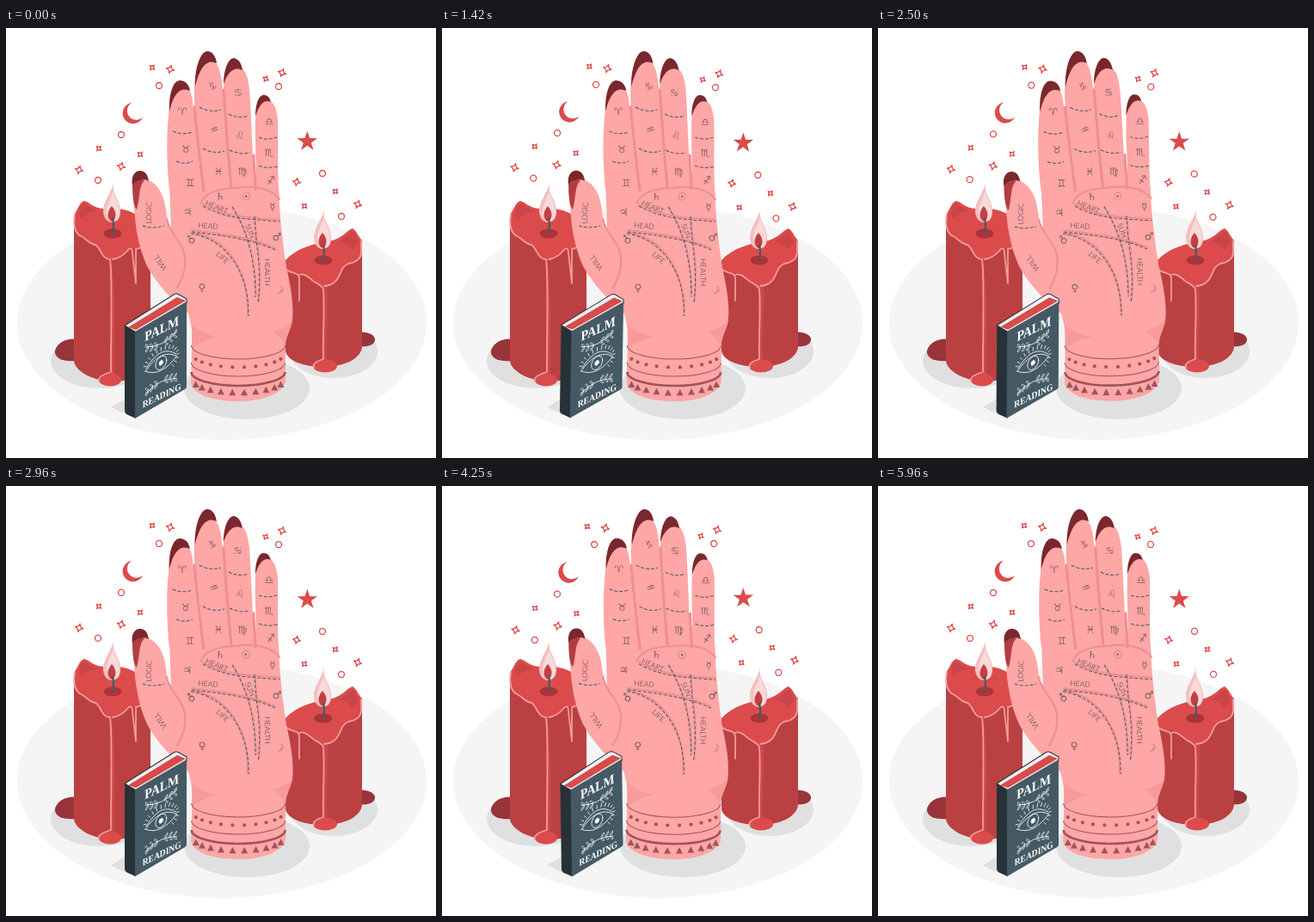
Write an HTML page that moves like this. It is 500 px wide and 500 px high and loops after 6 s.

```html
<!DOCTYPE html>
<html lang="en">
<head>
<meta charset="utf-8">
<title>Palm reading</title>
<style>
html, body { margin: 0; width: 100%; height: 100%; overflow: hidden; background: #fff; }
svg { display: block; width: 100vw; height: 100vh; }
.line { fill: none; stroke-linecap: round; stroke-linejoin: round; }
.crease { stroke: #ee8e8e; }
.dash { stroke: #455a64; stroke-width: 1; stroke-dasharray: 4 2; stroke-linecap: butt; }
.rim { stroke: #f59a9a; stroke-width: 1.8; }
.word { font: 300 8.6px Lato, sans-serif; fill: #37343c; text-anchor: middle; }
.glyph { font: 12px "DejaVu Sans", sans-serif; fill: #37343c; stroke: #ffa6a6; stroke-width: .35; text-anchor: middle; }
.title { font-family: "Liberation Serif", serif; font-weight: bold; fill: #fff; text-anchor: middle; }
</style>
</head>
<body>
<svg viewBox="0 0 500 500">
  <ellipse cx="251" cy="343" rx="238" ry="136" fill="#f5f5f5"/>
  <g fill="#e0e0e0">
    <ellipse cx="109" cy="387" rx="57" ry="32"/>
    <ellipse cx="381" cy="376" rx="51" ry="31"/>
    <ellipse cx="280" cy="419" rx="73" ry="36"/>
    <path d="M122 441L170 412L150 454Z"/>
  </g>

  <!-- left candle -->
  <path d="M80 362C67 360 56 370 57 378C59 386 70 388 80 387Z" fill="#98343a"/>
  <path d="M79 218V387C80 400 104 411 124 411C149 411 168 401 168 388V230Z" fill="#bb4042"/>
  <path d="M79 217C84 211 85 203 91 201C98 203 101 209 113 210C128 208 142 211 152 217L168 230V247C161 249 159 257 151 257C143 255 142 260 136 264C130 268 127 269 121 269C111 269 111 257 104 252C97 251 94 246 89 243C82 241 79 236 79 230Z" fill="#dc4b4c"/>
  <path d="M86 211C88 207 89 205 92 205C98 207 101 212 109 213C99 213 92 216 89 222C85 219 84 215 86 211Z" fill="#c94547"/>
  <path d="M121 268C126 280 127 330 126 402H121Z" fill="#cf4748"/>
  <ellipse cx="121" cy="409" rx="13" ry="7.5" fill="#dc4b4c"/>
  <path class="line rim" d="M80 217C78 229 80 240 89 243C94 246 97 251 104 252C111 257 111 269 121 269C124 290 122 350 122 400C114 402 106 406 108 411M124 269C132 268 137 264 142 258C145 255 147 256 147 262L151 297V257C159 257 161 249 168 247"/>

  <!-- right candle -->
  <path d="M412 354C422 353 430 358 429 363C428 369 420 371 412 370Z" fill="#98343a"/>
  <path d="M325 270V376C328 388 347 394 370 394C395 394 414 383 414 370V247Z" fill="#bb4042"/>
  <path d="M325 270C338 256 358 250 380 247C391 244 397 235 403 233C409 237 410 244 414 247V262C412 270 405 273 398 274C391 277 390 283 387 289C384 296 377 300 370 300C361 299 356 292 348 287C341 283 337 287 325 280Z" fill="#dc4b4c"/>
  <path d="M386 248C394 246 398 239 403 237C407 240 407 245 410 248C408 253 405 255 402 258C400 252 394 249 386 248Z" fill="#c94547"/>
  <path d="M368 300H374C375 325 372 350 373 386H368Z" fill="#cf4748"/>
  <ellipse cx="371" cy="393" rx="14" ry="7.5" fill="#dc4b4c"/>
  <path class="line rim" d="M326 281C334 287 340 283 341 291V317M341 287C348 284 354 293 360 296C365 299 368 300 369 304C371 330 368 355 369 385C362 387 356 390 358 395M370 300C377 300 384 296 387 289C390 283 391 277 398 274C405 273 412 270 413 262V248"/>

  <g id="flames"></g>
  <g id="sky" fill="none" stroke="#dc4b4c" stroke-width="1.3" stroke-linejoin="round"></g>

  <g id="hand">
    <g fill="#ffa6a6">
      <path d="M190 180L317 185C318 215 321 245 326 278C331 300 335 322 333 340C331 352 325 358 325 370V412C320 426 298 434 270 434C242 434 219 427 215 414L216 372C218 360 216 348 212 332C194 318 175 297 164 277C154 255 150 230 149 207C148 195 146 185 150 178L157 170L166 177C178 183 184 195 186 212C187 222 188 228 192 232Z"/>
      <path d="M190 188C186 150 187 115 190 92C193 76 198 70 204 69C213 68 216 75 217 85C220 110 222 150 230 190Z"/>
      <path d="M230 190C227 150 218 105 219 70C220 46 228 37 236 37C246 37 249 48 251 62C255 100 256 150 262 188Z"/>
      <path d="M261 188C258 150 252 100 253 68C254 52 260 45 267 45C278 45 281 55 283 70C286 110 286 150 290 188Z"/>
      <path d="M290 188C292 160 289 135 290 106C292 90 296 84 302 84C312 84 314 93 316 105C317 140 315 170 318 200Z"/>
    </g>
    <g fill="#f89a9a">
      <path d="M216 346C226 353 236 358 248 359C236 361 224 366 216 373Z"/>
      <path d="M333 340C326 347 318 351 309 353C316 357 321 362 325 369C325 358 331 352 333 340Z"/>
    </g>
    <g fill="#7a272d">
      <path d="M190 97C189 78 194 61 202 61C209 61 213 66 214 73C205 69 196 72 190 97Z"/>
      <path d="M220 68C219 48 226 27 234 27C240 27 244 33 245 41C236 37 227 40 220 68Z"/>
      <path d="M253 65C253 50 258 35 265 35C271 36 274 42 275 49C267 45 259 48 253 65Z"/>
      <path d="M290 103C290 88 294 77 300 78C305 78 307 82 308 86C301 83 295 87 290 103Z"/>
      <path d="M147 183C145 172 150 166 156 166C162 166 165 171 166 178C160 174 153 178 147 183Z"/>
    </g>
    <path d="M147 182C151 177 156 176 161 177C154 184 156 197 152 211C148 208 147 193 147 182Z" fill="#b23d41"/>
    <g class="line crease" stroke-width="3">
      <path d="M219 92C222 125 226 160 230 189"/>
      <path d="M253 72C256 112 258 150 262 184"/>
      <path d="M288 148C288 162 290 172 290 187"/>
    </g>
    <g class="line crease" stroke-width="2">
      <path d="M226 204C233 190 247 187 267 186C290 183 308 187 318 199"/>
      <path d="M187 222C190 240 206 248 208 266C209 282 205 292 199 302"/>
      <path d="M229 205C257 221 285 220 318 223M216 235C250 239 285 243 313 256M216 238C254 243 283 278 281 334"/>
      <path d="M264 208C282 237 291 270 291 311M290 219C291 255 299 276 294 318" stroke-width="1.3"/>
    </g>
    <path class="line dash" d="M194 120Q205 125 217 121M198 155Q208 159 217 155M225 92Q238 99 250 95M229 140Q241 147 254 143M259 100Q270 106 282 102M260 142Q272 148 284 145M294 127Q304 131 315 127M294 160Q304 164 316 161M159 230Q170 234 184 230M229 207C257 223 285 222 318 225M216 237C250 241 285 245 313 258M215 239C252 244 283 280 282 335M263 208C281 237 290 270 290 313M289 219C290 255 298 276 293 320"/>
    <g id="marks"></g>
    <g id="band" fill="#9c565b"></g>
  </g>

  <g id="book">
    <path d="M138 346L195 310Q198 308 201 310L210 315V320L151 354Z" fill="#eef0f1" stroke="#263238" stroke-width="1" stroke-linejoin="round"/>
    <path d="M142 348L199 313L209 317L151 351Z" fill="#d94a4b"/>
    <path d="M138 346L151 353V454L140 449Q138 447 138 445Z" fill="#263238"/>
    <path d="M150 353L210 318V417Q210 419 208 420L150 454Z" fill="#455a64"/>
    <g id="cover" transform="matrix(.866 -.42 0 1 150 351)" fill="none" stroke="#fff" stroke-width=".8" stroke-linecap="round"></g>
  </g>
</svg>
<script>
const $ = id => document.getElementById(id);
const add = (id, markup) => $(id).insertAdjacentHTML('beforeend', markup);
const rad = Math.PI / 180;

// Both flames share one shape; coordinates are relative to the wick base.
for (const [x, y] of [[124, 239], [369, 270]]) add('flames', `<g transform="translate(${x} ${y})">
  <ellipse rx="10.5" ry="5.5" fill="#a83539"/>
  <path d="M1-59C-2-46-12-36-11-25C-10-16-5-13 0-13C8-14 11-22 8-33C6-42-1-48 1-59Z" fill="#f4bfbf"/>
  <path d="M1-52C0-42-8-34-7-25C-6-17-3-14 0-14C7-15 9-22 7-32C5-41 0-45 1-52Z" fill="#f9dada"/>
  <path d="M-1-32C-7-25-7-17-1-14C5-17 5-25-1-32Z" fill="#c43f43"/>
  <path d="M0 0Q2-9 0-18" fill="none" stroke="#455a64" stroke-width="2.2"/></g>`);

// Sparkles: x, y, radius, tilt
const sparkles = [
  [170, 46, 3.6, 40], [191, 48, 4.8, 15], [108, 140, 3.6, 40], [134, 161, 4.8, 15], [156, 147, 3.6, 40],
  [85, 165, 4.8, 15], [302, 59, 3.6, 30], [321, 52, 4.8, 20], [338, 179, 4.6, 12], [383, 190, 3.6, 40],
  [409, 205, 4.8, 20], [347, 207, 3.6, 40]
];
for (const [x, y, r, tilt] of sparkles) {
  const k = r * .15;
  add('sky', `<path transform="translate(${x} ${y}) rotate(${tilt})" d="M0 ${-r}Q${k} ${-k} ${r} 0Q${k} ${k} 0 ${r}Q${-k} ${k} ${-r} 0Q${-k} ${-k} 0 ${-r}Z"/>`);
}
for (const [x, y] of [[178, 67], [134, 124], [107, 177], [317, 68], [368, 169], [390, 219]])
  add('sky', `<circle cx="${x}" cy="${y}" r="3.5"/>`);
const star = Array.from({ length: 10 }, (_, i) => {
  const r = i % 2 ? 4.8 : 12.3, a = (i * 36 - 90) * rad;
  return `${350.3 + r * Math.cos(a)},${132 + r * Math.sin(a)}`;
});
add('sky', `<g fill="#dc4b4c" stroke="none"><polygon points="${star}"/>
  <path d="M146 87A12.2 12.2 0 1 0 159 104A10.75 10.75 0 1 1 146 87Z"/></g>`);

// Hand lettering: text, x, y, angle
const label = (cls, [text, x, y, angle = 0]) =>
  add('marks', `<text class="${cls}" transform="translate(${x} ${y}) rotate(${angle})" y="${cls === 'word' ? 3.1 : 4.3}">${text}</text>`);
[['HEART', 245, 208, 23], ['HEAD', 235, 230, 4], ['SUN', 284, 236, 67], ['LIFE', 252, 267, 43],
 ['HEALTH', 304, 284, 90], ['LOGIC', 166, 215, -88], ['WILL', 179, 273, -125]].forEach(w => label('word', w));
[['♈', 205, 97], ['♉', 209, 141], ['♊', 214, 180], ['♑', 240, 68], ['♒', 242, 118, -20], ['♓', 247, 167],
 ['♋', 270, 75], ['♌', 272, 125], ['♍', 275, 167], ['♎', 306, 109], ['♏', 306, 145], ['♐', 308, 177, -10],
 ['♃', 211, 214], ['♄', 249, 196], ['☉', 279, 196], ['☿', 310, 208], ['♂', 315, 243], ['♂', 215, 246, -80],
 ['♀', 228, 302], ['☾', 318, 304, 200]].forEach(([c, ...at]) => label('glyph', [c + '\uFE0E', ...at]));

// Bracelet
for (const [y, w] of [[369, 1], [389, 1], [400, 2.6]])
  add('band', `<path d="M215.5 ${y}A54.5 16 0 0 0 324.5 ${y}" fill="none" stroke="#9c565b" stroke-width="${w}"/>`);
for (let i = 0; i < 10; i++) {
  const a = (156 - i * 14.7) * rad, x = 270 + 54 * Math.cos(a), s = 16 * Math.sin(a);
  add('band', `<circle cx="${x}" cy="${378.5 + s}" r="2.1"/>
    <path d="M${x} ${404 + s}l4 7.5h-8Z"/>`);
}

// Book cover
add('cover', `<g class="title" stroke="none">
  <text x="36" y="19" font-size="16">PALM</text><text x="36" y="95" font-size="11">READING</text></g>
  <path d="M14 54Q35 36 56 54Q35 70 14 54ZM15 51Q35 31 55 51"/>
  <circle cx="35" cy="53" r="7.5"/><circle cx="35" cy="53" r="2.6" fill="#fff"/>`);
for (let i = 0; i < 15; i++) {
  const a = (195 + i * 15) * rad, c = Math.cos(a), s = Math.sin(a);
  add('cover', `<path d="M${35 + 21 * c} ${52 + 13 * s}L${35 + 24 * c} ${52 + 17 * s}"/>`);
}
for (const [y, flip] of [[29, 1], [77, -1]]) {
  let sprig = '<path d="M-21-3Q0 7 21-3"/>';
  for (const x of [-17, -11, -5, 5, 11, 17]) {
    const stem = 2 - x * x * .012, lean = x < 0 ? -1 : 1;
    for (const side of [-1, 1])
      sprig += `<ellipse cx="${x + lean * 2}" cy="${stem + side * 2.5}" rx="2.6" ry="1" stroke-width=".6" transform="rotate(${lean * side * 45} ${x + lean * 2} ${stem + side * 2.5})"/>`;
  }
  add('cover', `<g transform="translate(35 ${y}) scale(1 ${flip})">${sprig}</g>`);
}

// Triangle wave in degrees: 0, 1, 0, -1, 0
const sway = p => p < .25 ? 4 * p : p < .75 ? 2 - 4 * p : 4 * p - 4;
const turn = (id, t, period, x, y) =>
  $(id).setAttribute('transform', `rotate(${sway(t % period / period)} ${x} ${y})`);

const start = performance.now();
function draw() {
  const t = performance.now() - start;
  turn('hand', t, 3000, 240.5, 230.5);
  turn('sky', t, 6000, 247, 126);
  turn('book', t, 6000, 174, 381);
  requestAnimationFrame(draw);
}
draw();
</script>
</body>
</html>
```
